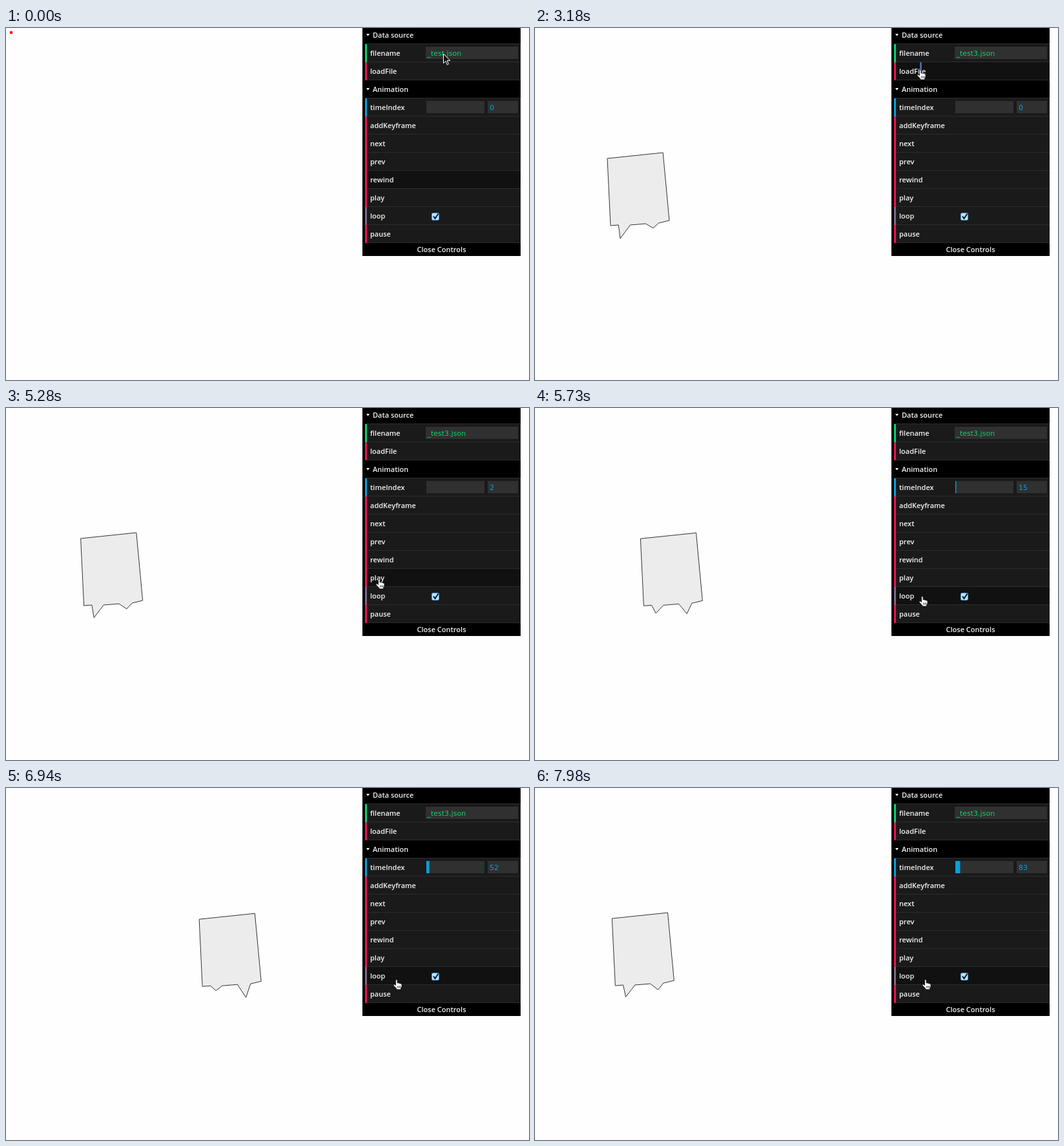
Recreate the animation shown at these times as an HTML page. Size 810x545 px, loop 8 s.

```html
<!DOCTYPE html>
<html lang="en">
<head>
<meta charset="utf-8">
<title>Keyframe panel</title>
<style>
  html, body { margin: 0; width: 100%; height: 100%; overflow: hidden; background: #fefefe; }
  svg { display: block; width: 810px; height: 545px; }
  text { font: 600 11px "Open Sans", "Noto Sans", sans-serif; fill: #f4f4f4; }
  .value { font: 11px "DejaVu Sans", sans-serif; }
</style>
</head>
<body>
<svg viewBox="0 0 810 545">
  <rect id="dot" x="6" y="5" width="4" height="4" fill="#f00"/>
  <path id="shape" fill="#ececec" stroke="#333" stroke-width="1"/>

  <rect x="552" width="245" height="353"/>
  <g id="rows"></g>
  <text x="674.5" y="347" text-anchor="middle">Close Controls</text>

  <rect id="field" x="650" y="29" width="143" height="19"/>
  <text id="file" class="value" x="652.5" y="43"></text>
  <rect id="caret" y="32" width="1" height="13" fill="#fff"/>
  <rect id="selection" x="596" y="53" width="3" height="13" fill="#4a78b4" opacity=".85"/>

  <rect x="651" y="113" width="90" height="19" fill="#303030"/>
  <rect id="bar" x="651" y="113" height="19" fill="#0a9fd9"/>
  <rect x="746" y="113" width="47" height="19" fill="#303030"/>
  <text id="index" class="value" x="749" y="127" style="fill:#0a9fd9"></text>

  <rect x="659.5" y="286.5" width="11" height="11" rx="2" fill="#b9e2fb" stroke="#4b9fd8"/>
  <path d="M662 291.5l2.5 3.5 5-7.5" fill="none" stroke="#061428" stroke-width="2"/>

  <path id="arrow" d="M677.5 40v14.5l3.4-3.2 2.4 5.6 2.2-1-2.4-5.4h4.7z" fill="#111" stroke="#fff"/>
  <path id="beam" d="M674 41.5h2l1 1 1-1h2M677 42v14M674 57.5h2l1-1 1 1h2" fill="none" stroke="#777"/>
  <path id="hand" d="M4.5 9.5V2.2c0-2 2.6-2 2.6 0v4c.5-1 2.3-.8 2.5.4.7-.8 2.2-.5 2.4.7.8-.5 2 0 2 1.2v3.2l-1.4 2.6v1.7H5.8v-1.6L1.2 9.8c-.8-1.5 1-2.4 2-1.4z M7.7 10.5v3M9.8 10.5v3M11.8 10.5v3" fill="#fff" stroke="#111" stroke-width=".9"/>
</svg>
<script>
const LOOP = 8000, STEP = 86.96, PLAY = 5106;
const GREEN = '#0bd36b', RED = '#ee1450', BLUE = '#0a9fd9', PURPLE = '#806787';
const el = id => document.getElementById(id);
const set = (id, attrs) => { for (const k in attrs) el(id).setAttribute(k, attrs[k]); };
const show = (id, on) => set(id, { visibility: on ? 'visible' : 'hidden' });

// A row without a colour is a folder title.
const rows = [
  ['Data source'], ['filename', GREEN], ['loadFile', RED],
  ['Animation'], ['timeIndex', BLUE], ['addKeyframe', RED], ['next', RED], ['prev', RED],
  ['rewind', RED], ['play', RED], ['loop', PURPLE], ['pause', RED]
];
el('rows').innerHTML = rows.map(([name, color], i) => {
  const y = 28 * i - 3;
  const line = `<rect x="556" y="${y + 27}" width="241" height="1" fill="#2c2c2c"/>`;
  return color
    ? `<rect id="row${i}" x="556" y="${y}" width="241" height="27"/>${line}
       <rect x="556" y="${y}" width="3" height="28" fill="${color}"/>
       <text x="564" y="${y + 18}">${name}</text>`
    : `${line}<path d="M558 ${y + 12}h5l-2.5 3.5z" fill="#fff"/>
       <text x="568" y="${y + 18}">${name}</text>`;
}).join('');

// Hand cursor: time, left, top
const path = [
  [590, 670, 56], [770, 668, 67], [2560, 668, 67], [3000, 591, 64], [3340, 591, 64],
  [3830, 556, 170], [4220, 573, 278], [4310, 573, 276], [4480, 574, 265],
  [4840, 571, 263], [5270, 571, 263], [5800, 599, 296], [LOOP, 599, 296]
];
function handAt(t) {
  const i = Math.max(1, path.findIndex(p => p[0] >= t));
  const [a, b] = [path[i - 1], path[i]];
  const u = Math.max(0, (t - a[0]) / (b[0] - a[0]));
  return [1, 2].map(k => a[k] + (b[k] - a[k]) * u);
}

// The two lower tips swing in opposite directions while the body glides right.
function outline(pose) {
  const phase = pose / 10.2 % 2;
  const swing = phase < 1 ? phase : 2 - phase;
  const dx = 112 + 3.67 * pose, dy = 0.024 * pose;
  const points = [
    [0, 202], [86.2, 193], [96, 298], [79.5, 302], [71 + 1.5 * swing, 309.7 + 13.5 * swing],
    [59.3, 303], [35.5, 305], [20 + 6 * swing, 326 - 13.5 * swing], [17.3, 305], [5, 306]
  ];
  return 'M' + points.map(([x, y]) => `${(x + dx).toFixed(2)} ${(y + dy).toFixed(2)}`).join('L') + 'Z';
}

function draw(t) {
  const tick = PLAY + STEP * Math.floor((t - PLAY) / STEP);
  const index = Math.max(0, Math.floor((tick - 5183) * 0.03));
  const loaded = t >= 3090, focused = t >= 320 && !loaded, typed = t >= 1660;

  show('dot', !loaded);
  show('shape', loaded);
  set('shape', { d: outline(Math.max(0, index - 1) % 80) });

  set('field', { fill: focused ? '#494949' : '#303030' });
  el('file').textContent = typed ? '_test3.json' : '_test.json';
  el('file').style.fill = focused ? '#fff' : GREEN;
  set('caret', { x: typed ? 685 : 678 });
  show('caret', focused && (t < 680 || (t >= 1210 && t < 2200) || t >= 2735));
  show('selection', loaded && t < 5110);

  el('index').textContent = index;
  set('bar', { width: index < 10 ? 0 : index * 0.09 });

  const [x, y] = handAt(t < 2560 ? t : Math.max(2560, tick));
  const hover = t < 590 ? 8 : Math.floor((y + 4) / 28);
  rows.forEach(([, color], i) => color && set('row' + i, { fill: i === hover ? '#111' : '#1a1a1a' }));
  show('arrow', t < 180);
  show('beam', t >= 180 && t < 680);
  show('hand', t >= 680);
  set('hand', { transform: `translate(${Math.round(x)} ${Math.round(y)})` });
}

const start = performance.now();
function frame() {
  draw((performance.now() - start) % LOOP);
  requestAnimationFrame(frame);
}
draw(0);
requestAnimationFrame(frame);
</script>
</body>
</html>
```
